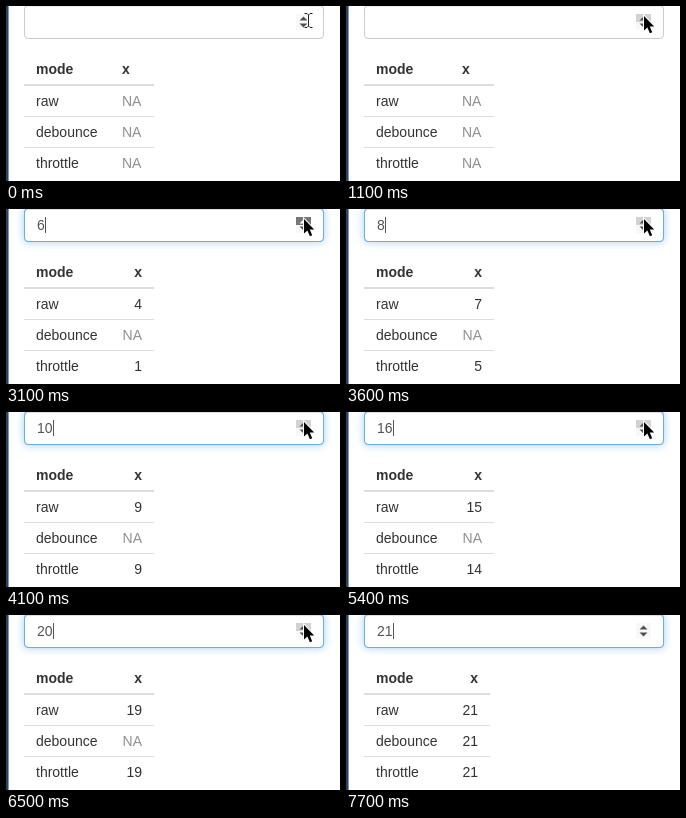
An HTML page for the animation above (8 s loop, 334 px wide and 175 px high).

```html
<!DOCTYPE html>
<html lang="en">
<head>
<meta charset="utf-8">
<title>Throttle and debounce</title>
<style>
  html, body { margin: 0; width: 100%; height: 100%; overflow: hidden; background: #fff; }
  #stage { position: absolute; left: 0; top: 0; width: 334px; height: 175px; overflow: hidden; }
  .side { position: absolute; left: 0; top: 0; width: 2px; height: 175px; background: #274666; border-right: 1px solid #8496a8; }
  .field { position: absolute; left: 18px; top: -1px; width: 300px; height: 34px; box-sizing: border-box;
    border: 1px solid #ccc; border-radius: 4px; box-shadow: inset 0 1px 1px rgba(0,0,0,.075); }
  #glow { border-color: #66afe9; box-shadow: inset 0 1px 1px rgba(0,0,0,.075), 0 0 8px rgba(102,175,233,.6); }
  svg { position: absolute; left: 0; top: 0; }
  text { font: 14px "Liberation Sans", Arial, sans-serif; fill: #333; }
  .head { font-weight: bold; }
  .end { text-anchor: end; }
  #value { fill: #555; }
  .na { fill: #909090; }
</style>
</head>
<body>
<div id="stage">
  <div class="side"></div>
  <div class="field"></div>
  <div class="field" id="glow"></div>
  <svg width="334" height="175" viewBox="0 0 334 175">
    <g fill="#ddd">
      <rect class="line" x="18" y="78" height="2"/>
      <rect class="line" x="18" y="110" height="1"/>
      <rect class="line" x="18" y="141" height="1"/>
    </g>
    <text class="head" x="30" y="68">mode</text>
    <text x="30" y="100">raw</text>
    <text x="30" y="131">debounce</text>
    <text x="30" y="162">throttle</text>
    <text class="head" id="x" y="68">x</text>
    <text id="raw" y="100"></text>
    <text id="debounce" y="131"></text>
    <text id="throttle" y="162"></text>
    <text id="value" x="31" y="21"></text>
    <rect id="caret" y="8" width="1" height="16" fill="#555"/>
    <rect x="290" y="8" width="15" height="16" fill="#f8f8f8"/>
    <rect id="button" x="290" y="8" width="15" height="8"/>
    <path id="up" d="M293.5 14.5L297.5 10.5L301.5 14.5Z"/>
    <path d="M293.5 17.5L297.5 21.5L301.5 17.5Z" fill="#505050"/>
    <g id="beam" fill="none">
      <path id="bar" d="M298.5 7.5H301L302.5 9L304 7.5H306.5M302.5 9V20M298.5 21.5H301L302.5 20L304 21.5H306.5" stroke="#fff" stroke-width="3"/>
      <use href="#bar" style="display:none"/>
      <path d="M298.5 7.5H301L302.5 9L304 7.5H306.5M302.5 9V20M298.5 21.5H301L302.5 20L304 21.5H306.5" stroke="#222"/>
    </g>
    <path id="arrow" d="M0 0V14.5L3.4 11.5L5.9 17.2L8.2 16.2L5.8 10.6H10.2Z" stroke="#fff" stroke-width="2" paint-order="stroke"/>
  </svg>
</div>
<script>
const LOOP = 8000;
const LAST = 21;
const FIRST_CLICK = 1940, PERIOD = 229;
const LAG = 250;
const FOCUS = 1700, LEAVE = 7200, SETTLE = 7700;
const throttleTicks = [2200, 3200, 4100, 5300, 6400, 7300];

const $ = id => document.getElementById(id);
const lines = document.querySelectorAll('.line');
const clamp = (v, lo, hi) => Math.min(hi, Math.max(lo, v));
const show = (node, on) => node.setAttribute('visibility', on ? 'visible' : 'hidden');

const clicks = t => clamp(Math.floor((t - FIRST_CLICK) / PERIOD) + 1, 0, LAST);
const rawAt = t => clicks(t - LAG);
const throttleAt = t => rawAt(Math.max(0, ...throttleTicks.filter(tick => tick <= t)));

// Columns align right once the table holds a number.
function cell(id, text, numeric, right) {
  const node = $(id);
  node.textContent = text;
  node.setAttribute('x', numeric ? right : 116);
  node.classList.toggle('end', numeric);
  node.classList.toggle('na', text === 'NA');
}

function drawTable(t) {
  const raw = rawAt(t);
  const settled = t >= SETTLE ? raw : 0;
  const width = settled ? 126 : 130;
  const right = width + 6;
  lines.forEach(line => line.setAttribute('width', width));
  cell('x', 'x', raw > 0, right);
  cell('raw', raw || 'NA', raw > 0, right);
  cell('throttle', throttleAt(t) || 'NA', raw > 0, right);
  cell('debounce', settled || 'NA', raw > 0, right);
}

function drawField(t) {
  const text = String(clicks(t) || '');
  const focus = clamp((t - FOCUS) / 150, 0, 1);
  $('glow').style.opacity = focus * focus * (3 - 2 * focus);
  $('value').textContent = text;
  $('caret').setAttribute('x', 31 + Math.round(text.length * 7.8));
  show($('caret'), t >= FOCUS && !(t >= LEAVE && t < SETTLE));
}

function drawPointer(t) {
  const arrived = t >= 900;
  const over = arrived && t < LEAVE;
  const step = clamp(Math.floor((t - 900) / 100) / 2, 0, 1);
  const phase = (t - FIRST_CLICK) % PERIOD;
  const down = over && clicks(t) > 0 && clicks(t) % 3 === 0 && phase < 120;
  show($('beam'), !arrived);
  show($('arrow'), over);
  $('arrow').setAttribute('transform', `translate(${302 - 4 * step} ${13 - 3 * step})`);
  show($('button'), over);
  $('button').setAttribute('fill', down ? '#787878' : '#d2d2d2');
  $('up').setAttribute('fill', down ? '#fff' : '#505050');
}

const start = performance.now();
function tick() {
  const t = (performance.now() - start) % LOOP;
  drawTable(t);
  drawField(t);
  drawPointer(t);
  requestAnimationFrame(tick);
}
tick();
</script>
</body>
</html>
```
